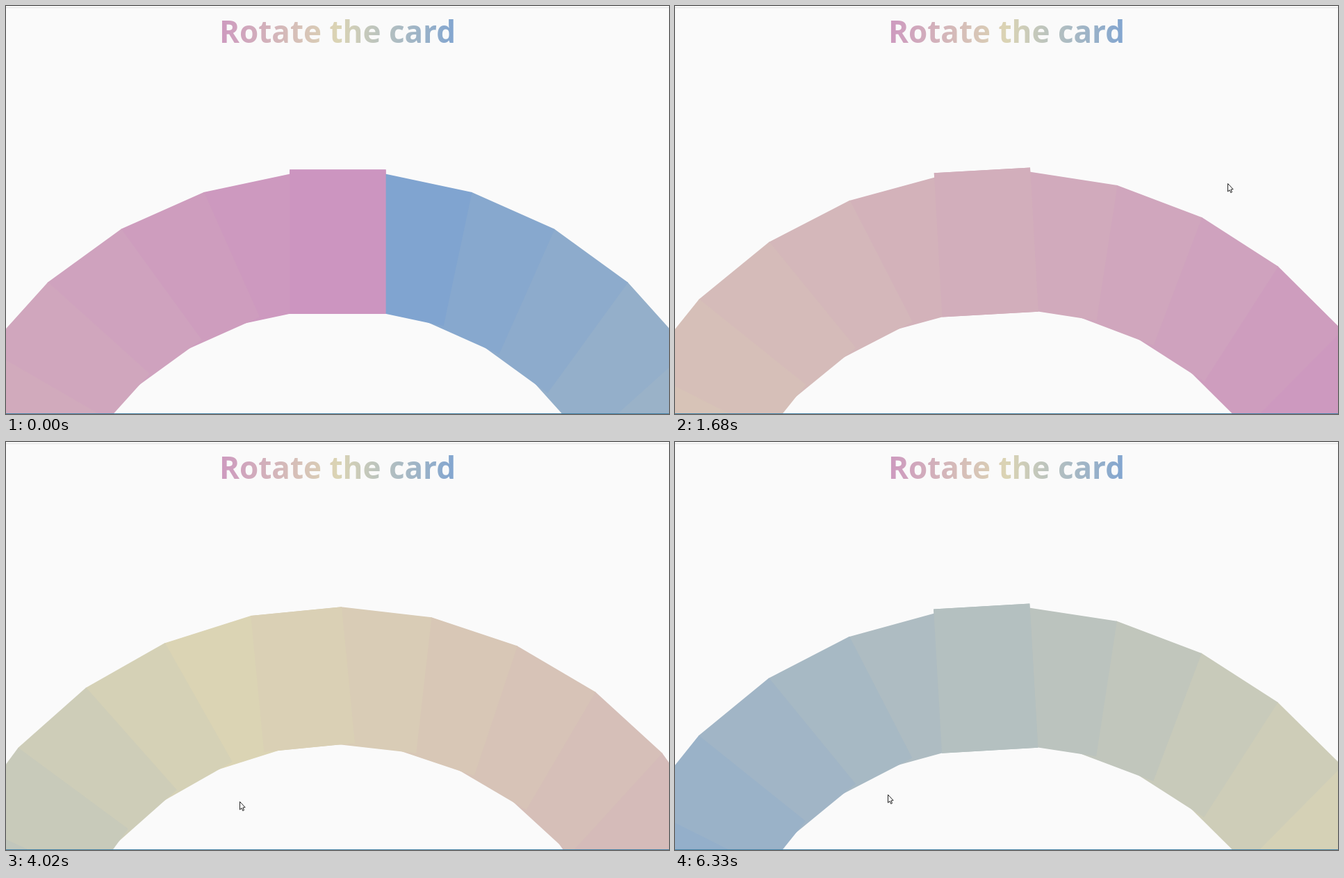
Write an HTML page with a canvas that moves like this. It is 954 px wide and 587 px high and loops after 6.36 s.

```html
<!DOCTYPE html>
<html lang="en">
<head>
<meta charset="utf-8">
<title>Rotate the card</title>
<style>
  html, body { margin: 0; width: 100%; height: 100%; overflow: hidden; background: #fafafa; }
  canvas { display: block; }
</style>
</head>
<body>
<canvas id="stage" width="954" height="587"></canvas>
<script>
const ctx = document.getElementById('stage').getContext('2d');
const LOOP = 6360, STEP = 30;
const COUNT = 30, SPACING = 360 / COUNT;
const HUB = { x: 477.4, y: 861 };
const CARD = { w: 131.2, h: 196.8, radius: 521.8, zoom: 1.055 };
const PINK = [204, 149, 192], SAND = [219, 212, 180], BLUE = [122, 161, 210];

// After each drag the hand holds still, then moves back for the next one
const HOLD = 90, RETURN = 300;
const ENTRY = { time: 60, at: [215, 19] };
const DRAGS = [
  { start: 518, end: 1875, from: [110, 440], via: [109, 20], to: [869, 279] },
  { start: 2400, end: 2900, from: [284, 451], to: [678, 526] },
  { start: 3450, end: 3770, from: [250, 490], to: [476, 545] },
  { start: 4230, end: 5220, from: [222, 495], to: [691, 555] },
  { start: 6000, end: 6330, from: [206, 562], to: [306, 507] }
];

const clamp = (v, lo, hi) => Math.min(hi, Math.max(lo, v));
const mix = (a, b, t) => a.map((v, i) => v + (b[i] - v) * t);
const rgb = c => `rgb(${c.map(Math.round).join(',')})`;
const ease = u => (1 - Math.cos(Math.PI * clamp(u, 0, 1))) / 2;
const hubAngle = ([x, y]) => Math.atan2(x - HUB.x, HUB.y - y) * 180 / Math.PI;

function curve({ from, to, via = mix(from, to, 0.5) }, u) {
  return mix(mix(from, via, u), mix(via, to, u), u);
}

// The wheel turns by the angle the pointer sweeps around the hub while dragging
function poseAt(t) {
  let pointer = ENTRY.at, leave = ENTRY.time, turn = 0;
  for (const drag of DRAGS) {
    if (t < drag.start) {
      return { pointer: mix(pointer, drag.from, ease((t - leave) / RETURN)), turn };
    }
    pointer = curve(drag, ease((t - drag.start) / (drag.end - drag.start)));
    turn += hubAngle(pointer) - hubAngle(drag.from);
    leave = drag.end + HOLD;
    if (t < leave) break;
  }
  return { pointer, turn };
}

function cardColor(i) {
  const t = i / COUNT * 2;
  return rgb(t < 1 ? mix(PINK, SAND, t) : mix(SAND, BLUE, t - 1));
}

function drawCard({ i, angle }) {
  const lift = clamp((5.5 - Math.abs(angle)) / 1.2, 0, 1);
  const s = 1 + (CARD.zoom - 1) * lift;
  ctx.save();
  ctx.translate(HUB.x, HUB.y);
  ctx.rotate(angle * Math.PI / 180);
  ctx.translate(0, -CARD.radius);
  ctx.scale(s, s);
  ctx.fillStyle = cardColor(i);
  ctx.fillRect(-CARD.w / 2, -CARD.h / 2, CARD.w, CARD.h);
  ctx.restore();
}

function drawWheel(turn) {
  const cards = Array.from({ length: COUNT }, (_, i) => ({
    i, angle: ((turn - i * SPACING + 180) % 360 + 360) % 360 - 180
  }));
  cards.forEach(drawCard);
  // The card coming up to the top lies over its neighbours
  drawCard(cards[Math.round((turn + 2) / SPACING) % COUNT]);
}

function drawTitle() {
  const g = ctx.createLinearGradient(294, 0, 660, 0);
  [PINK, SAND, BLUE].forEach((c, i) => g.addColorStop(i / 2, rgb(c)));
  ctx.fillStyle = g;
  ctx.font = "bold 44px 'Open Sans', 'Noto Sans', sans-serif";
  ctx.textAlign = 'center';
  ctx.fillText('Rotate the card', 477, 53);
}

const ARROW = new Path2D('M0 0V11.5L2.6 9.2L4.2 13L6 12.2L4.4 8.5L7.6 8.2Z');

function drawPointer([x, y]) {
  ctx.save();
  ctx.translate(Math.round(x) + 0.5, Math.round(y) + 0.5);
  ctx.fillStyle = '#fff';
  ctx.strokeStyle = '#222';
  ctx.lineWidth = 1;
  ctx.fill(ARROW);
  ctx.stroke(ARROW);
  ctx.restore();
}

function draw(t) {
  const { pointer, turn } = poseAt(t);
  ctx.fillStyle = '#fafafa';
  ctx.fillRect(0, 0, 954, 587);
  ctx.fillStyle = '#e4e4e4';
  ctx.fillRect(0, 2, 954, 1);
  drawTitle();
  drawWheel(turn);
  ctx.fillStyle = '#4682a5';
  ctx.fillRect(0, 586, 954, 1);
  if (t >= ENTRY.time) drawPointer(pointer);
}

function tick() {
  const t = performance.now() % LOOP;
  draw(Math.floor(t / STEP) * STEP);
  requestAnimationFrame(tick);
}
tick();
</script>
</body>
</html>
```
